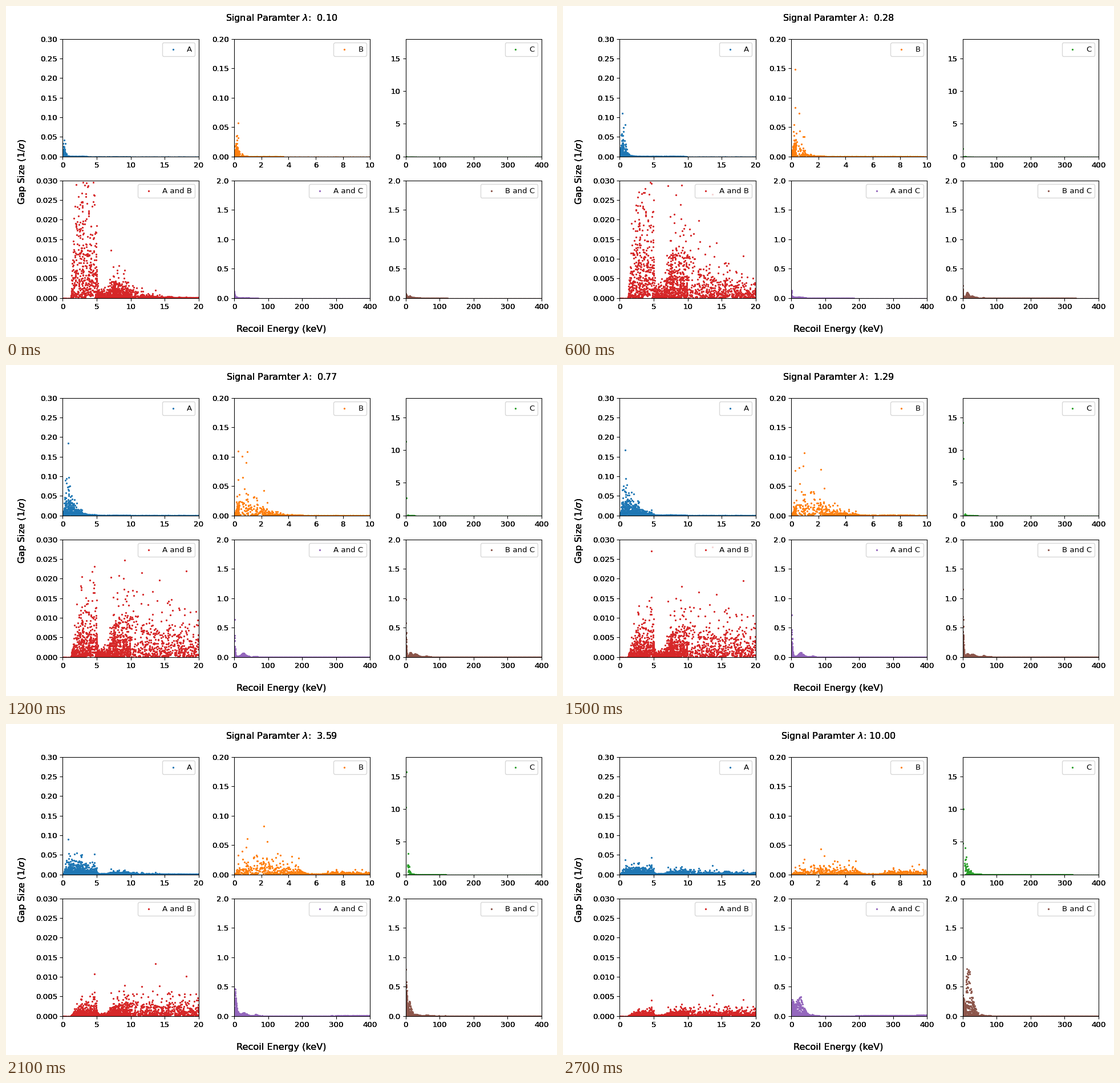
Animation, 966 px wide and 580 px high, one loop 3000 ms. Source, as a matplotlib script:

```python
import numpy as np
import matplotlib.pyplot as plt
from matplotlib.animation import FuncAnimation

W, H, DPI = 966, 580, 96.6
AX_W, AX_H = 238.5, 206
LAMBDAS = np.logspace(-1, 1, 10)
rng = np.random.default_rng(12)

plt.rcParams["font.family"] = "DejaVu Sans"


def bump(x, center, width):
    return np.exp(-((x - center) / width) ** 2)


def rise(x):
    """Smooth step from 0 at x = 0 towards 1."""
    return 1 - np.exp(-np.maximum(x, 0))


def decay(x, a, rate=1):
    """Exponential recoil spectrum as a function of the signal parameter."""
    return lambda lam: a * np.exp(-rate * x / lam) / lam


def light_gaps(x):
    """Random gap sizes: a hump below 5 keV, a dip, then a plateau."""
    hump = .068 * rise(2 * x**2) / (1 + np.exp((x - 5.05) / .06))
    scale = .01 * rise(x) + hump + .09 * rise((x - 6.4) / 1.5)
    return scale * rng.exponential(size=x.size)


def light_pair():
    x = np.r_[rng.uniform(0, 10, 1300), rng.uniform(10, 20, 500),
              rng.uniform(0, .4, 60), .8, 13.65]
    a = light_gaps(x)
    a[-2:] = .4, .9
    shared = a / 16 * rise((x - 1.2) / 1.2)
    return (x, decay(x, a)), (x, decay(x, shared, .0415))


def single_b():
    x = np.r_[rng.uniform(0, 10, 620), rng.uniform(0, .35, 110), .31, .95]
    a = .85 * light_gaps(x)
    a[-2:] = .126, .286
    return x, decay(x, a)


def single_c():
    x = np.r_[np.linspace(12, 400, 400), rng.uniform(8, 32, 40),
              rng.uniform(6, 11, 7), 1.42, 3.25]
    a = np.r_[np.full(400, 20), 60 * rng.random(40) ** 2,
              rng.uniform(25, 90, 7), 55, 139]
    return x, decay(x, a)


def heavy_pair(rate, knee, growth, soft, key):
    """Sum of a slowly and a quickly falling component."""
    x = np.r_[rng.uniform(0, 10, 200), rng.uniform(10, 45, 250),
              np.linspace(0, 400, 450), key[0]]
    top = np.where(x < 10, 4.5 * x**3 / (x**3 + knee),
                   np.minimum(2 * np.exp(x / growth), 60))
    a = top * rng.random(x.size) ** np.where(x < 10, 2, 3)
    a[-1] = key[1]
    slow = decay(x, soft(x) * rng.uniform(.2, 1, x.size), rate)
    fast = decay(x, a)
    return x, lambda lam: slow(lam) + fast(lam)


def soft_ac(x):
    return (.012 + .28 * bump(x, 30, 9) + .25 * bump(x, 64, 5)
            + 1.2 * (x / 400) ** 6)


def soft_bc(x):
    return (.008 + .09 * bump(x, 15, 4) + .1 * bump(x, 30, 9)
            + .12 * bump(x, 63, 5))


def embolden(text, passes=3):
    draw = text.draw

    def overdraw(renderer):
        for _ in range(passes):
            draw(renderer)

    text.draw = overdraw


data_a, data_ab = light_pair()
data_ac = heavy_pair(.047, 3.5, 8.5, soft_ac, key=(1.2, 2.32))
data_bc = heavy_pair(.025, 1.5, 4.8, soft_bc, key=(1.31, 4.1))

# label, data, x limit, x step, y limit, y step
PANELS = [
    ("A", data_a, 20, 5, .3, .05),
    ("B", single_b(), 10, 2, .2, .05),
    ("C", single_c(), 400, 100, 18, 5),
    ("A and B", data_ab, 20, 5, .03, .005),
    ("A and C", data_ac, 400, 100, 2, .5),
    ("B and C", data_bc, 400, 100, 2, .5),
]

fig = plt.figure(figsize=((W + .001) / DPI, (H + .001) / DPI), dpi=DPI)
title = fig.suptitle("")
for text in (title, fig.supxlabel("Recoil Energy (keV)"),
             fig.supylabel(r"Gap Size (1/$\sigma$)")):
    embolden(text)

dots = []
for i, (label, (x, _), xmax, xstep, ymax, ystep) in enumerate(PANELS):
    left = 99.4 + 300.55 * (i % 3)
    bottom = H - 263.6 - 248 * (i // 3)
    if i >= 3:
        bottom = H - 511.6
    ax = fig.add_axes([left / W, bottom / H, AX_W / W, AX_H / H])
    dots.append(ax.scatter(x, 0 * x, s=2, color=f"C{i}", label=label))
    ax.set_xticks(np.arange(0, xmax + xstep / 2, xstep))
    ax.set_yticks(np.arange(0, ymax + ystep / 100, ystep))
    ax.set(xlim=(0, xmax), ylim=(0, ymax))
    ax.legend(loc="upper right")
    for text in ax.get_xticklabels() + ax.get_yticklabels():
        embolden(text)


def update(frame):
    lam = LAMBDAS[frame]
    title.set_text(rf"Signal Paramter $\lambda$: {lam:5.2f}")
    for dot, (_, (x, gap), _, _, ymax, _) in zip(dots, PANELS):
        y = gap(lam)
        # Vanishing gaps sink behind the axis line.
        y = np.where(y > 1e-15 * ymax, y, -1.5 * ymax / AX_H)
        dot.set_offsets(np.c_[x, y])
    return [title, *dots]


anim = FuncAnimation(fig, update, frames=len(LAMBDAS), interval=300,
                     repeat=True, repeat_delay=0)
plt.show()
```
